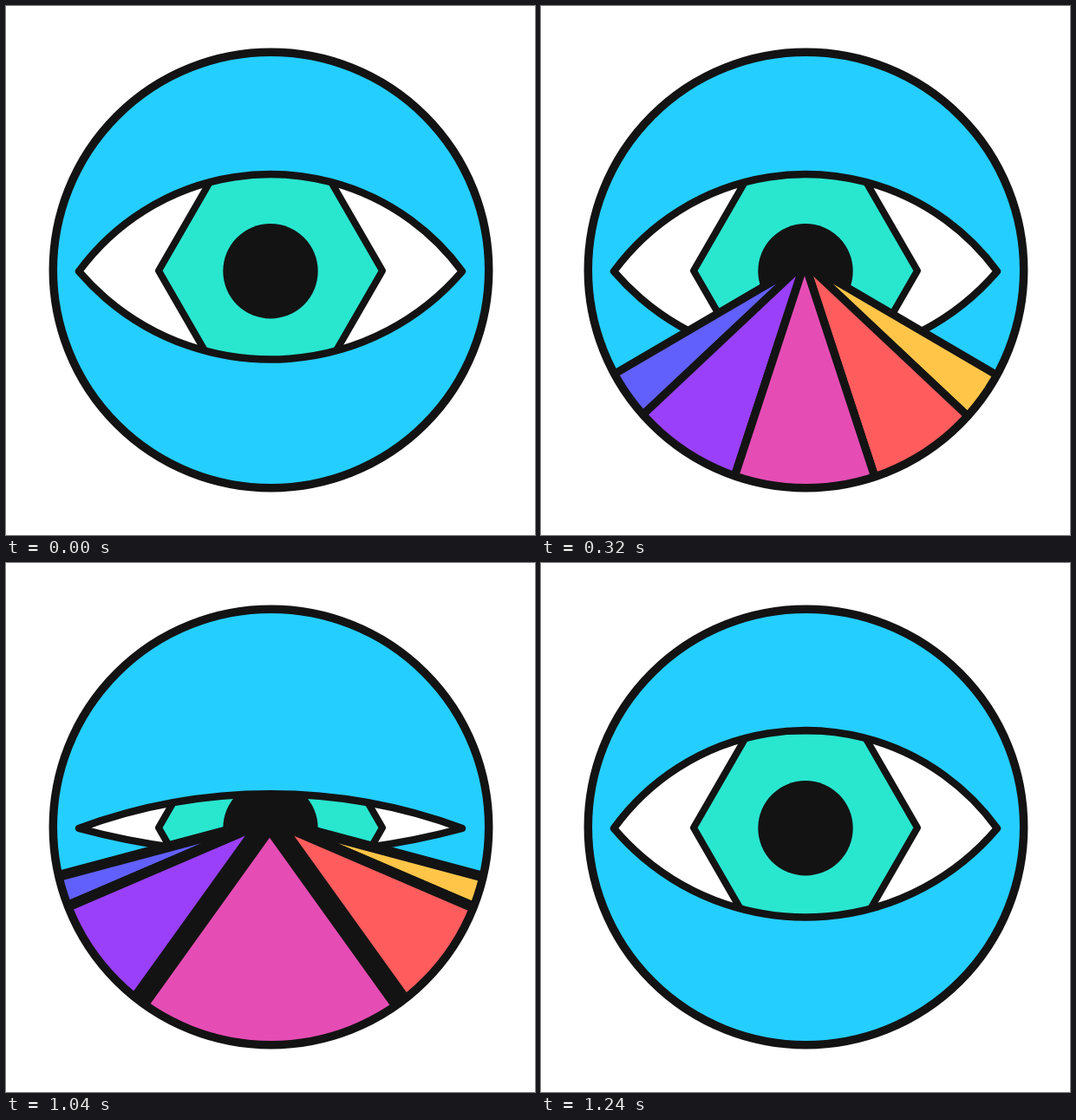
These frames come from a looping animation (610 px wide and 610 px high, 1280 ms). An HTML page with a canvas:

```html
<!DOCTYPE html>
<html lang="en">
<head>
<meta charset="utf-8">
<title>Eye with rainbow rays</title>
<style>
  html, body { margin: 0; width: 100%; height: 100%; overflow: hidden; background: #fff; }
  canvas { display: block; }
</style>
</head>
<body>
<canvas id="stage" width="610" height="610"></canvas>
<script>
const ctx = document.getElementById('stage').getContext('2d');
const STEP = 40, LOOP = 1280, BLINK_START = 23;
const INK = '#131313', SKY = '#24ceff', TEAL = '#29e6cf';
const CX = 305, EYE_Y = 306, HALF_EYE = 221;

// Ray pairs from the outside in; the last pair forms the single middle ray.
const RAYS = [
  { slope: 0.585, length: 177, left: '#6260fc', right: '#ffc548' },
  { slope: 0.94, length: 168, left: '#9a40fb', right: '#ff5c5e' },
  { slope: 3.05, length: 186, left: '#e54db5' },
];

function poly(points) {
  ctx.beginPath();
  points.forEach(p => ctx.lineTo(...p));
  ctx.closePath();
}

function disc(x, y, r) {
  ctx.beginPath();
  ctx.arc(x, y, r, 0, 2 * Math.PI);
}

function paint(fill, width) {
  ctx.fillStyle = fill;
  ctx.fill();
  if (!width) return;
  ctx.lineWidth = width;
  ctx.stroke();
}

// Circular arc over the eye's width; side is -1 for the upper lid, 1 for the lower.
function lid(height, side) {
  const r = (HALF_EYE ** 2 + height ** 2) / (2 * height);
  const spread = Math.asin(HALF_EYE / r);
  const middle = side * Math.PI / 2;
  ctx.arc(CX, EYE_Y + side * (height - r), r, middle - spread, middle + spread);
}

function eyePath(open) {
  ctx.beginPath();
  lid(Math.max(open, 1), -1);
  lid(Math.max(open - 10.5, 1), 1);
  ctx.closePath();
}

function drawEye(open) {
  ctx.save();
  eyePath(open);
  paint('#fff');
  ctx.clip();
  poly(Array.from({ length: 6 }, (_, i) => {
    const a = i * Math.PI / 3;
    return [CX + 129 * Math.cos(a), 305.3 + 129 * Math.sin(a)];
  }));
  paint(TEAL, 8);
  disc(CX, 305.7, 54.7);
  paint(INK);
  ctx.restore();
  eyePath(open);
  ctx.lineWidth = 8.5;
  ctx.stroke();
}

// Each ray ends level, reaching in to the edge of the next ray.
function drawRays({ reach, tilt, hubY, width }) {
  RAYS.forEach(({ slope, length, left, right }, i) => {
    const next = RAYS[i + 1];
    const angle = Math.atan(slope * tilt);
    const dx = length * reach * Math.cos(angle);
    const dy = length * reach * Math.sin(angle);
    const inner = next ? dy / (next.slope * tilt) : -dx;
    const ray = (color, side, line) => {
      poly([[304, hubY], [304 + side * dx, hubY + dy], [304 + side * inner, hubY + dy]]);
      paint(color, line);
    };
    ray(left, -1, next ? width : width * (1.05 + 1.8 * (1 - tilt)));
    if (right) ray(right, 1, width);
  });
}

function raysAt(step) {
  const k = step - BLINK_START;
  if (step < 1 || k > 4) return null;
  if (k < 1) return { reach: step / 3, tilt: 1, hubY: 296, width: 9 };
  return { reach: 99, tilt: 1 - (k / 4.07) ** 2, hubY: 296 + 5.5 * Math.abs(3 - k), width: 12 };
}

// The lid widens a little, drops fast, then eases open again.
function lidAt(step) {
  const k = step - BLINK_START;
  if (k < 1) return 112;
  return k < 5 ? Math.max(6, 120 - 4 * k ** 2.73) : 113 * (1 - ((8 - k) / 4) ** 1.9);
}

function draw(now) {
  const step = Math.floor(now % LOOP / STEP);
  const rays = raysAt(step);
  ctx.clearRect(0, 0, 610, 610);
  ctx.strokeStyle = INK;
  ctx.lineJoin = 'round';

  ctx.save();
  disc(305.5, 304.5, 251.2);
  paint(SKY);
  ctx.clip();
  drawEye(lidAt(step));
  if (rays) drawRays(rays);
  ctx.restore();

  disc(305.5, 304.5, 251.2);
  ctx.lineWidth = 9.5;
  ctx.stroke();
}

const start = performance.now();
function tick() {
  draw(performance.now() - start);
  requestAnimationFrame(tick);
}
tick();
</script>
</body>
</html>
```
